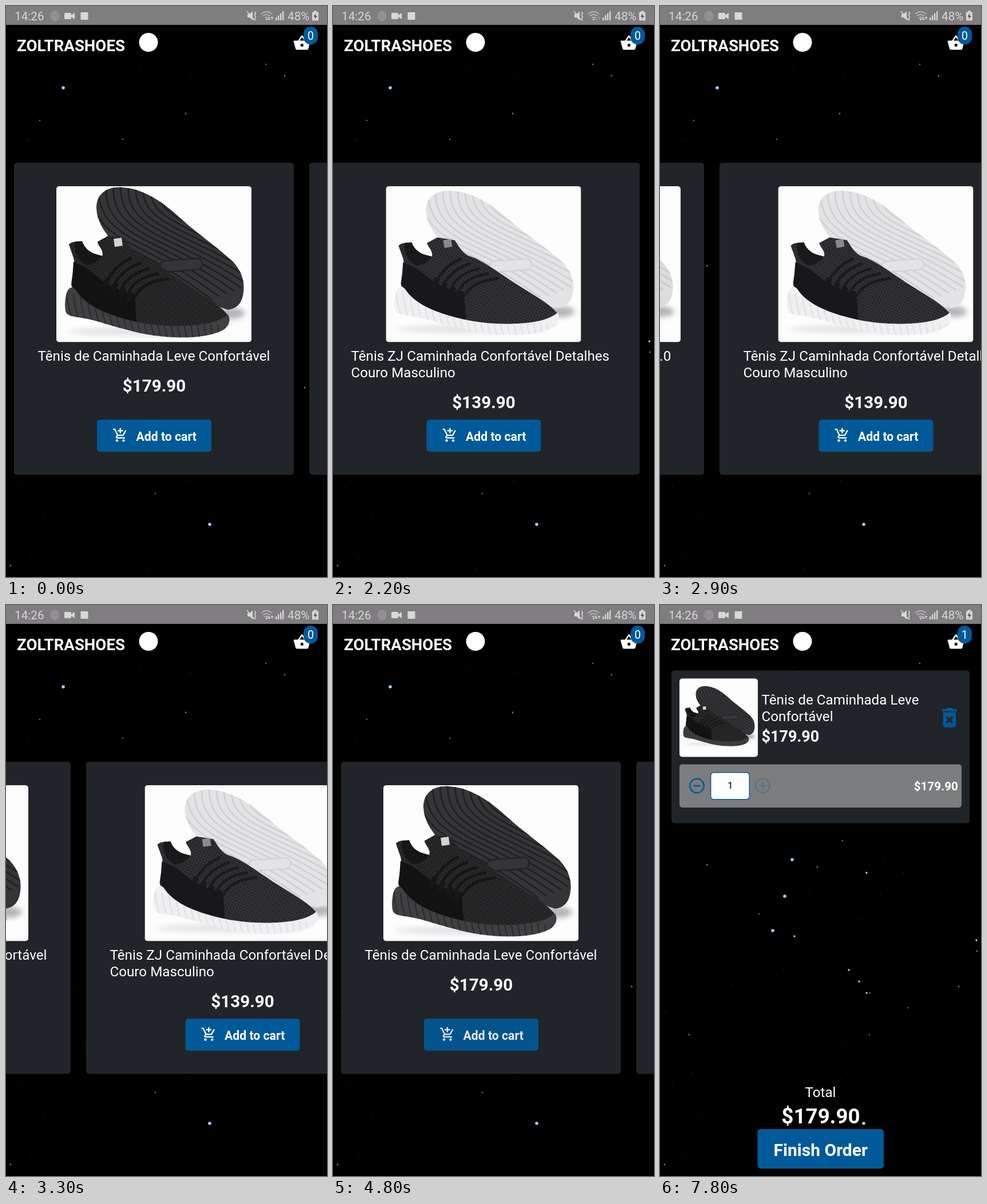
An HTML page that plays this animation: 561 px wide and 998 px high, repeating every 8000 ms.

```html
<!DOCTYPE html>
<html lang="pt">
<head>
<meta charset="utf-8">
<title>Shoe store</title>
<style>
  html, body { margin: 0; width: 100%; height: 100%; overflow: hidden; background: #000; }
  svg { display: block; width: 561px; height: 998px; font-family: Roboto, "Noto Sans", sans-serif; fill: #fff; }
  .b { font-weight: 700; }
  .m { text-anchor: middle; }
  .e { text-anchor: end; }
</style>
</head>
<body>
<svg id="stage" viewBox="0 0 561 998"></svg>
<script>
const LOOP = 8000, STEP = 100;
const BLUE = '#005a99', CARD = '#212428', BAR = '#d9d8d9', DIM_BAR = '#b8b7b8';

const text = (x, y, size, str, cls = '', extra = '') =>
  `<text x="${x}" y="${y}" font-size="${size}" class="${cls}" ${extra}>${str}</text>`;
const rect = (x, y, w, h, fill, r = 5, extra = '') =>
  `<rect x="${x}" y="${y}" width="${w}" height="${h}" rx="${r}" fill="${fill}" ${extra}/>`;
const path = (d, fill = '#fff', extra = '') => `<path d="${d}" fill="${fill}" ${extra}/>`;
const line = (d, color, width, extra = '') =>
  `<path d="${d}" fill="none" stroke="${color}" stroke-width="${width}" ${extra}/>`;
const icon = (d, x, y, scale, fill = '#fff') =>
  path(d, fill, `transform="translate(${x} ${y}) scale(${scale})"`);
const shadow = (cx, cy, rx, ry, fill) =>
  `<ellipse cx="${cx}" cy="${cy}" rx="${rx}" ry="${ry}" fill="${fill}" filter="url(#soft)"/>`;
const repeat = (n, fn) => Array.from({ length: n }, (_, i) => fn(i)).join('');

const ICONS = {
  basket: 'M17.21 9l-4.38-6.56c-.19-.28-.51-.42-.83-.42-.32 0-.64.14-.83.43L6.79 9H2c-.55 0-1 .45-1 1 0 .09.01.18.04.27l2.54 9.27c.23.84 1 1.46 1.92 1.46h13c.92 0 1.69-.62 1.93-1.46l2.54-9.27L23 10c0-.55-.45-1-1-1h-4.79zM9 9l3-4.4L15 9H9zm3 8c-1.1 0-2-.9-2-2s.9-2 2-2 2 .9 2 2-.9 2-2 2z',
  addCart: 'M11 9h2V6h3V4h-3V1h-2v3H8v2h3v3zm-4 9c-1.1 0-2 .9-2 2s.9 2 2 2 2-.9 2-2-.9-2-2-2zm10 0c-1.1 0-2 .9-2 2s.9 2 2 2 2-.9 2-2-.9-2-2-2zm-9.83-3.25l.03-.12.9-1.63h7.45c.75 0 1.41-.41 1.75-1.03l3.86-7.01L19.42 4h-.01l-1.1 2-2.76 5H8.53l-.13-.27L6.16 6l-.95-2-.94-2H1v2h2l3.6 7.59-1.35 2.45c-.16.28-.25.61-.25.96 0 1.1.9 2 2 2h12v-2H7.42c-.13 0-.25-.11-.25-.25z',
  trash: 'M6 19c0 1.1.9 2 2 2h8c1.1 0 2-.9 2-2V7H6v12zm2.46-7.12l1.41-1.41L12 12.59l2.12-2.12 1.41 1.41L13.41 14l2.12 2.12-1.41 1.41L12 15.41l-2.12 2.12-1.41-1.41L10.59 14l-2.13-2.12zM15.5 4l-1-1h-5l-1 1H5v2h14V4z'
};

// Stars: colour, radius, then x,y pairs
const STARS = [
  ['#9fcfff', 2.8, '100,143 231,445 218,509 197,569 356,906'],
  ['#c9ccd2', 1.7, '361,468 235,579 348,658 361,678 553,586 330,638'],
  ['#b0614f', 1.4, '487,122 314,188 554,605 522,667 51,751 82,454 8,978 275,458'],
  ['#77757a', 1.2, '59,200 204,233 433,704 366,751 367,678 261,852 454,102 173,540 319,412'],
  ['#33333a', .8, '45,965 250,984 68,889 22,840 316,830 9,711 56,818 138,774 125,663 215,638 318,763 347,549 393,449 425,468 262,498 385,507 39,234 233,111 322,119']
];
const sky = STARS.map(([color, r, points]) => points.split(' ').map(p => {
  const [x, y] = p.split(',');
  return `<circle cx="${x}" cy="${y}" r="${r}" fill="${color}"/>`;
}).join('')).join('');

const SHAPE = {
  sole: 'M70 38C70 12 90 0 115 2C150 4 182 25 209 49C242 80 272 99 302 126C322 142 330 165 327 185C325 205 315 214 300 216C260 205 200 160 150 130C110 110 72 80 70 38Z',
  upper: 'M22 102Q26 96 45 96C49 108 58 116 70 119L80 122C84 112 72 104 72 97L90 87L120 92C128 104 134 117 148 122C172 130 198 152 228 172C254 190 287 207 300 226C300 250 250 255 200 252L140 246L40 215L26 172C28 150 34 140 30 125Z',
  inside: 'M45 96C49 108 58 116 70 119L80 122Q68 138 52 138L40 128Q30 110 33 98Z',
  panel: 'M30 132L52 142C75 160 90 178 137 190L140 240C95 230 62 214 38 190L27 172Z',
  mid: 'M17 190C20 177 28 172 35 183C53 211 95 227 140 237C180 246 230 246 262 240C280 237 292 231 300 224C306 235 301 247 288 253C260 266 215 266 180 262C140 258 100 244 60 233C38 228 22 229 17 221C14 212 15 200 17 190Z'
};
const SHOES = [
  { sole: '#353537', groove: '#1f1f21', upper: '#2a2a2c', inside: '#161617', panel: '#121213', mid: '#404042', rib: '#2a2a2c', lace: '#161617', tag: '#d4d4d4', mesh: .4, fit: '' },
  { sole: '#e3e3e5', groove: '#cfcfd2', upper: '#323236', inside: '#19191b', panel: '#18181a', mid: '#f0f0f2', rib: '#dfdfe2', lace: '#1b1b1d', tag: '#8a8a8c', mesh: .4, fit: 'translate(0 6) scale(1 .96)' },
  { sole: '#dcdcde', groove: '#cacacd', upper: '#e6e6e8', inside: '#b3b2b2', panel: '#a09d9b', mid: '#e6e6e8', rib: '#d5d5d8', lace: '#f8f8f8', tag: '#8b898a', mesh: .12, fit: 'translate(0 6) scale(1 .96)' }
];
const shoe = (s, i) => `<g id="shoe${i}"><g transform="${s.fit}">
  ${shadow(150, 254, 130, 7, '#e2e2e4')}${shadow(305, 222, 25, 10, '#b4b4b7')}
  ${path(SHAPE.sole, s.sole)}
  <g clip-path="url(#soleClip)">
    ${repeat(13, n => line(`M${48 + n * 13} -6c-4 ${52 - n} 18 ${84 - n * 3} 74 ${112 - n * 3}s90 ${48 - n} 150 ${92 - n * 2}`, s.groove, 2.6))}
    <rect x="181" y="128" width="74" height="20" rx="10" fill="${s.sole}" stroke="${s.groove}" stroke-width="2" transform="rotate(-4 218 138)"/>
  </g>
  ${path(SHAPE.upper, s.upper)}
  ${path(SHAPE.upper, 'url(#mesh)', `opacity="${s.mesh}"`)}
  ${path(SHAPE.inside, s.inside)}${path(SHAPE.panel, s.panel)}
  ${path(SHAPE.mid, s.mid)}
  <g clip-path="url(#midClip)">${repeat(25, n => line(`M${18 + n * 12} ${186 + n * 2.6}q2 24 10 48`, s.rib, 2))}</g>
  ${repeat(4, n => rect(82 + n * 14, 160 + n * 8, 10, 18, s.inside, 2, `transform="rotate(22 ${87 + n * 14} ${169 + n * 8})"`))}
  ${repeat(5, n => line(`M${90 + n * 12} ${164 + n * 7}q14 -26 ${40 + n * 4} ${-38 + n * 2}`, s.lace, 5, 'stroke-linecap="round"'))}
  ${rect(101, 91, 14, 14, s.tag, 0, 'transform="rotate(-8 108 98)"')}
</g></g>`;

const defs = `<defs>
  <filter id="soft" x="-50%" y="-100%" width="200%" height="300%"><feGaussianBlur stdDeviation="5"/></filter>
  <clipPath id="soleClip"><path d="${SHAPE.sole}"/></clipPath>
  <clipPath id="midClip"><path d="${SHAPE.mid}"/></clipPath>
  <clipPath id="photoClip"><rect width="341" height="272.5" rx="5"/></clipPath>
  <pattern id="mesh" width="5" height="5" patternUnits="userSpaceOnUse" patternTransform="rotate(25)">
    <circle cx="2.5" cy="2.5" r="1.5" fill="#000"/></pattern>
  ${SHOES.map(shoe).join('')}
</defs>`;

const PRODUCTS = [
  { title: ['Tênis de Caminhada Leve Confortável'], price: '$179.90', width: 489 },
  { title: ['Tênis ZJ Caminhada Confortável Detalhes', 'Couro Masculino'], price: '$139.90', width: 546 },
  { title: ['Tênis Olvara Berumo Lite 2.0'], price: '$219.90', width: 423 }
];
const ORDER = [0, 1, 2, 1, 2, 0], GAP = 27;

function card(kind, x, first) {
  const { title, price, width } = PRODUCTS[kind], mid = width / 2;
  const lines = title.length > 1
    ? title.map((s, i) => text(41.5, 620 + i * 29, 24.2, s)).join('')
    : text(mid, 620, 24.2, title[0], 'm');
  return `<g transform="translate(${x} 0)">
    ${rect(0, 274, width, 545.5, CARD)}
    <g transform="translate(${mid - 170.5} 315)" clip-path="url(#photoClip)">
      ${rect(0, 0, 341, 272.5, '#fdfdfe', 0)}<use href="#shoe${kind}"/></g>
    ${lines}
    ${text(mid + .5, 674 + (title.length - 1) * 29, 29.6, price, 'b m')}
    <g ${first ? 'id="addButton"' : ''}>
      ${rect(mid - 99.5, 723, 200, 56, BLUE)}
      ${icon(ICONS.addCart, mid - 72.5, 736.5, 1.15)}
      ${text(mid - 31, 759.5, 21.2, 'Add to cart', 'b')}
    </g></g>`;
}

let nextX = 14;
const cards = ORDER.map((kind, i) => {
  const x = nextX;
  nextX += PRODUCTS[kind].width + GAP;
  return card(kind, x, i === 0);
}).join('');

const ring = (cx, bar) => `<circle cx="${cx}" cy="316" r="12.2" fill="none" stroke="${BLUE}" stroke-width="2.6"/>`
  + line(`M${cx - 6.5} 316h13${bar}`, BLUE, 2.6);

const cart = `
  ${rect(20, 114.5, 521, 267, CARD)}
  ${rect(34, 128.5, 137, 137, '#fdfdfe')}
  <use href="#shoe0" transform="translate(34.5 141) scale(.4)"/>
  ${text(177.5, 174, 24.2, 'Tênis de Caminhada Leve')}
  ${text(177.5, 203, 24.2, 'Confortável')}
  ${text(177.5, 239, 27, '$179.90', 'b')}
  ${icon(ICONS.trash, 483.5, 174.5, 1.87, BLUE)}
  ${rect(34, 278.5, 493, 75.5, '#7b7d7f')}
  ${ring(64.5, '')}
  <g id="plus">${ring(179.5, 'm-6.5 -6.5v13')}</g>
  ${rect(88.7, 292.7, 67.5, 47, '#fff', 5, `stroke="${BLUE}" stroke-width="1.4"`)}
  ${text(122.7, 321, 16, '1', 'm', 'fill="#222" font-weight="500"')}
  ${text(521, 324, 20.7, '$179.90', 'b e')}
  ${text(280.5, 860, 24.2, 'Total', 'm')}
  ${text(281, 906, 36.8, '$179.90', 'b m')}
  ${rect(170.5, 916, 220.5, 69, BLUE)}
  ${text(280.8, 962.5, 30, 'Finish Order', 'b m')}`;

const header = `
  ${rect(0, 33, 561, 61, '#000', 0)}
  ${text(19, 79, 27.6, 'ZOLTRASHOES', 'b')}
  <circle cx="249" cy="63.5" r="16.5"/>
  ${icon(ICONS.basket, 501.3, 48.5, 1.33)}
  ${rect(520, 36, 25, 31.5, BLUE, 12.5)}
  ${text(532.5, 59, 19.5, '0', 'm', 'id="badge"')}`;

const statusBar = `
  ${rect(0, 0, 561, 33, '#7f7d7f', 0)}
  <g fill="${BAR}">
    ${text(15, 25.3, 20.7, '14:26')}
    ${repeat(3, i => `<ellipse cx="85.5" cy="17.5" rx="${2 + i * 2.5}" ry="${3 + i * 2.5}" fill="none" stroke="#a3a1a3" stroke-width="1.3"/>`)}
    ${rect(102, 12, 12, 11, BAR, 1.5)}${path('M114 16l6 -4v11l-6 -4z', BAR)}
    ${rect(130.5, 11, 13, 13, BAR, 0)}
    ${path('M422 14h4l5 -5v16l-5 -5h-4z', BAR)}
    ${line('M421 9l13 16', BAR, 1.6)}
    ${line('M434.5 10l2 3l-2 3l2 3l-2 3l2 3', BAR, 1.4)}
    ${line('M446 14q9.5 -8 19 0M449 17.5q6.5 -5 13 0M452 21q3.5 -2.5 7 0', DIM_BAR, 1.8)}
    <circle cx="455.5" cy="23.5" r="1.6"/>
    ${line('M460 19v5M458 22l2 2l2 -2M465 24v-5M463 21l2 -2l2 2', BAR, 1.2, 'id="traffic"')}
    ${repeat(4, i => rect(471 + i * 4, 20 - i * 3.6, 2.4, 5 + i * 3.6, BAR, 0))}
    ${text(492, 25.3, 20.7, '48%')}
    ${rect(535, 10.5, 11, 15, BAR, 1.5)}${rect(538, 8.5, 5, 3, BAR, 0)}
    ${path('M541.5 12l-4 7h3l-1 5l4.5 -7h-3z', '#555')}
  </g>`;

document.getElementById('stage').innerHTML = `${defs}
  ${rect(0, 0, 561, 998, '#000', 0)}${sky}
  <g id="home"><g id="list">${cards}</g></g>
  <g id="cart">${cart}</g>
  ${header}${statusBar}`;

const part = Object.fromEntries(['home', 'list', 'cart', 'addButton', 'plus', 'badge', 'traffic']
  .map(id => [id, document.getElementById(id)]));

// One value per step, from the given start time
const SCROLL = { start: 1900, values: [138, 300, 430, 540, 635, 715, 786, 1050, 1330, 1500, 1449, 1210, 920, 640, 390, 190, 60] };
const PRESS = { start: 4500, values: [.45, .25, .6, .9] };
const sample = (track, t, rest) => track.values[Math.floor((t - track.start) / STEP)] ?? rest;

function draw(now) {
  const t = Math.floor((now % LOOP) / STEP) * STEP;
  part.list.setAttribute('transform', `translate(${-sample(SCROLL, t, 0)} 0)`);
  part.addButton.setAttribute('opacity', sample(PRESS, t, 1));
  part.badge.textContent = t < 6200 ? '0' : '1';

  // The cart rises and fades in, easing out
  const p = Math.min(1, Math.max(0, (t - 6220) / 280));
  const eased = 1 - (1 - p) ** 4;
  part.home.setAttribute('opacity', 1 - eased);
  part.cart.setAttribute('opacity', eased);
  part.cart.setAttribute('transform', `translate(0 ${(1 - eased) * 77})`);

  part.plus.setAttribute('opacity', t < 7800 ? 1 : .25);
  const quiet = (t >= 1500 && t < 2800) || (t >= 6700 && t < 7800);
  part.traffic.setAttribute('opacity', quiet ? .35 : 1);
}

const begin = performance.now();
function tick() {
  draw(performance.now() - begin);
  requestAnimationFrame(tick);
}
tick();
</script>
</body>
</html>
```
